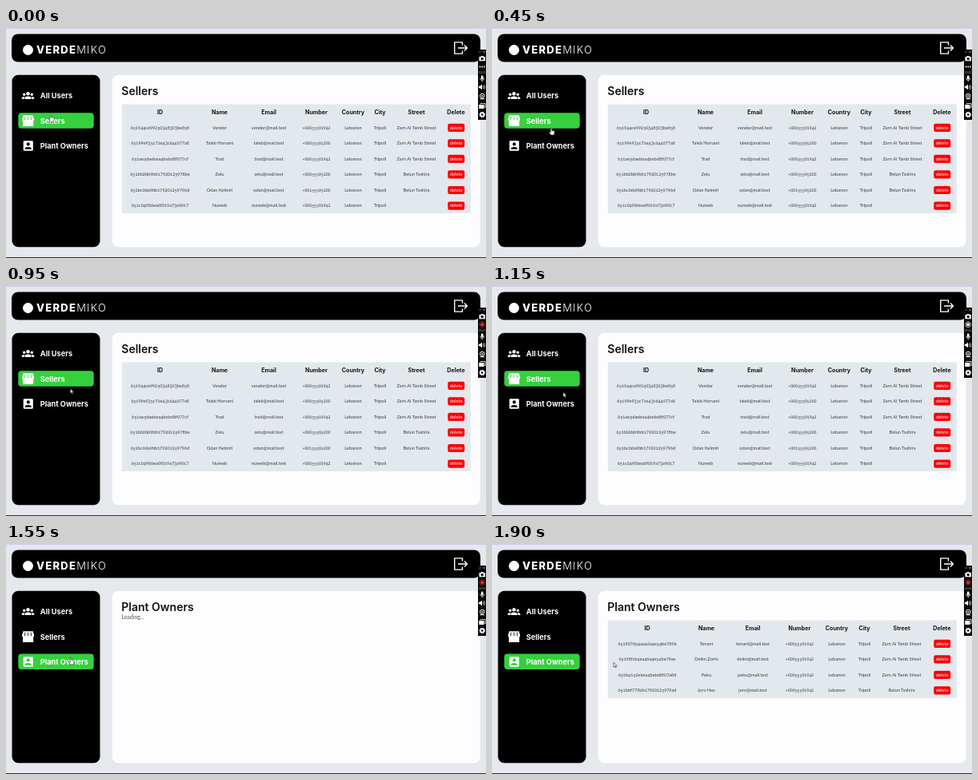
These frames come from a looping animation (600x288 px, 1.95 s). An HTML page:

```html
<!DOCTYPE html>
<html lang="en">
<head>
<meta charset="utf-8">
<title>Admin dashboard</title>
<style>
html, body { margin: 0; width: 100%; height: 100%; overflow: hidden; background: #e5e9ed; }
svg { display: block; width: 100vw; height: 100vh; }
text { font-family: Inter, sans-serif; }
.logo { font-size: 13px; font-weight: 800; letter-spacing: 1.25px; fill: #fff; }
.logo .thin { font-weight: 300; }
.menu { font-size: 9.2px; font-weight: 700; fill: #fff; }
.title { font-size: 14px; font-weight: 600; fill: #111; }
.head { font-size: 7.1px; font-weight: 700; fill: #151515; text-anchor: middle; }
.cell { font: 5.7px Lato, sans-serif; fill: #3c3e40; text-anchor: middle; font-variant-numeric: oldstyle-nums; }
.num { font-size: 5.4px; }
.del { font: 5.8px Lato, sans-serif; fill: #fff; text-anchor: middle; }
.load { font: 6.8px Lato, sans-serif; fill: #555; }

.sellers, .loading, .owners, .rows, .hover, .dots, .red, .white, .hand, .arrow {
  animation: 1950ms step-end infinite;
}
.sellers { animation-name: sellers; }
.loading { animation-name: loading; }
.owners { animation-name: owners; }
.rows { animation-name: rows; }
.hover { animation-name: hover; }
.dots { animation-name: dots; }
.red { animation-name: red; }
.white { animation-name: white; }
.hand { animation-name: hand; }
.arrow { animation-name: arrow; }
.cursor { animation: move 1950ms linear infinite; }

@keyframes sellers { 0% { opacity: 1 } 79.487%, 100% { opacity: 0 } }
@keyframes loading { 0% { opacity: 0 } 79.487% { opacity: 1 } 89.744%, 100% { opacity: 0 } }
@keyframes owners { 0% { opacity: 0 } 79.487%, 100% { opacity: 1 } }
@keyframes rows { 0% { opacity: 0 } 89.744%, 100% { opacity: 1 } }
@keyframes hover { 0% { opacity: 0 } 64.103%, 100% { opacity: 1 } }
@keyframes dots { 0% { opacity: 1 } 25.641%, 100% { opacity: 0 } }
@keyframes red { 0% { opacity: 0 } 25.641% { opacity: 1 } 51.282% { opacity: 0 } 79.487%, 100% { opacity: 1 } }
@keyframes white { 0% { opacity: 0 } 51.282% { opacity: 1 } 79.487%, 100% { opacity: 0 } }
@keyframes hand { 0% { opacity: 1 } 43.59% { opacity: 0 } 64.103% { opacity: 1 } 87.179%, 100% { opacity: 0 } }
@keyframes arrow { 0% { opacity: 0 } 43.59% { opacity: 1 } 64.103% { opacity: 0 } 87.179%, 100% { opacity: 1 } }
/* the pointer advances once every 50 ms */
@keyframes move {
  0% { transform: translate(56px, 108.5px); animation-timing-function: steps(3) }
  7.692%, 15.385% { transform: translate(70px, 120px); animation-timing-function: steps(2) }
  20.513% { transform: translate(74px, 125px) }
  41.026% { transform: translate(74px, 125px); animation-timing-function: steps(7) }
  58.974% { transform: translate(89px, 133px); animation-timing-function: steps(4) }
  69.231% { transform: translate(81px, 142px) }
  79.487% { transform: translate(81px, 142px); animation-timing-function: steps(6) }
  94.872%, 100% { transform: translate(152px, 148px) }
}
</style>
</head>
<body>
<svg viewBox="0 0 600 288" preserveAspectRatio="none">
  <rect width="600" height="288" fill="#e5e9ed"/>
  <rect width="600" height="1" fill="#cfcbee"/>
  <rect y="287" width="600" height="1" fill="#26282c"/>

  <rect x="7" y="7.500" width="586" height="35" rx="8"/>
  <circle cx="27.500" cy="27.500" r="6.500" fill="#fff"/>
  <text class="logo" x="38" y="31.700">VERDE<tspan class="thin">MIKO</tspan></text>
  <g fill="none" stroke="#fff" stroke-width="1.400" stroke-linejoin="round">
    <path d="M570.500 21.500V17.900H560.700V32.100H570.500V28.500M565 25H576.500M573 21.500L576.500 25L573 28.500"/>
  </g>

  <rect x="7.500" y="58.700" width="110" height="215.600" rx="8"/>
  <rect class="sellers" x="15.300" y="106.300" width="94.400" height="19.400" rx="4" fill="#34d13d"/>
  <rect class="hover" x="15.300" y="137.600" width="94.400" height="19.400" rx="4" fill="#34d13d"/>
  <g fill="#fff">
    <circle cx="27.500" cy="82.300" r="2.200"/>
    <circle cx="22.700" cy="83.200" r="1.700"/>
    <circle cx="32.300" cy="83.200" r="1.700"/>
    <path d="M23.500 89V87.600Q23.500 85.500 27.500 85.500T31.500 87.600V89ZM19.700 89V87.600Q19.800 85.800 23.200 85.900Q22.600 86.600 22.600 89ZM35.300 89V87.600Q35.200 85.800 31.800 85.900Q32.400 86.600 32.400 89Z"/>
    <path fill-rule="evenodd" d="M21.500 109.300H33.700L35.200 114.200Q35.200 116 34.200 116.500V123H21V116.500Q20 116 20 114.200ZM23.500 110.800L23 115H23.900L24.300 110.800ZM27.100 110.800V115H27.900V110.800ZM30.700 110.800L31.100 115H32L31.500 110.800Z"/>
    <path fill-rule="evenodd" d="M23 141.300H32.500Q33.800 141.300 33.800 142.600V152.400Q33.800 153.700 32.500 153.700H23Q21.700 153.700 21.700 152.400V142.600Q21.700 141.300 23 141.300ZM27.750 143.300A2.100 2.100 0 0 0 27.750 147.500A2.100 2.100 0 0 0 27.750 143.300ZM23.700 151.800H31.800V151Q31.500 148.900 27.750 148.900T23.700 151Z"/>
  </g>
  <text class="menu" x="42.800" y="88.300">All Users</text>
  <text class="menu" x="42.800" y="119.500">Sellers</text>
  <text class="menu" x="42.800" y="150.700">Plant Owners</text>

  <rect x="132.700" y="58.700" width="460" height="215.600" rx="8" fill="#fdfdff"/>
  <g class="sellers">
    <text class="title" x="144.300" y="84.200">Sellers</text>
    <g id="sellers"></g>
  </g>
  <g class="owners">
    <text class="title" x="144.300" y="84.200">Plant Owners</text>
    <text class="load loading" x="144.500" y="93.600">Loading...</text>
    <g id="owners" class="rows"></g>
  </g>

  <g fill="#fff">
    <rect x="590" y="27" width="10" height="88" fill="#0a0a0a"/>
    <path d="M591.500 31L593.500 29M596.500 29L598.500 31M598.500 29L596.500 31" stroke="#bbb" stroke-width=".6"/>
    <path fill-rule="evenodd" d="M591.500 36H593.300L594 35H596.500L597.200 36H599V41.300H591.500ZM595.200 36.800A1.700 1.700 0 0 0 595.200 40.200A1.700 1.700 0 0 0 595.200 36.800Z"/>
    <g class="dots">
      <circle cx="592.500" cy="48.500" r=".9"/><circle cx="595.200" cy="48.500" r=".9"/><circle cx="597.900" cy="48.500" r=".9"/>
    </g>
    <g class="red">
      <circle cx="595.200" cy="48.300" r="3.300" fill="none" stroke="#c8322c" stroke-width=".7"/>
      <circle cx="595.200" cy="48.300" r="2" fill="#e8362f"/>
    </g>
    <g class="white">
      <circle cx="595.200" cy="48.300" r="3.300" fill="none" stroke="#fff" stroke-width=".8"/>
      <circle cx="595.200" cy="48.300" r="2"/>
    </g>
    <text x="595.100" y="56.500" font-size="3" text-anchor="middle" fill="#aaa">00:00</text>
    <rect x="593.900" y="59.500" width="2.600" height="5" rx="1.300"/>
    <path d="M592.700 62.500Q592.700 65.600 595.200 65.600T597.700 62.500M595.200 65.600V67.300" fill="none" stroke="#fff" stroke-width=".7"/>
    <path d="M591 72.800H592.500L595 70.800V77.200L592.500 75.200H591Z"/>
    <path d="M596.200 72.300Q597.300 74 596.200 75.700M597.500 71Q599.700 74 597.500 77" fill="none" stroke="#fff" stroke-width=".7"/>
    <circle cx="595.200" cy="84.900" r="2.700" fill="none" stroke="#fff" stroke-width="1"/>
    <circle cx="595.200" cy="84.900" r="1"/>
    <path d="M592.500 88.700H598" stroke="#fff" stroke-width="1"/>
    <path d="M593 95.500V94.500H599V99.500H598" fill="none" stroke="#fff" stroke-width=".8"/>
    <rect x="591.300" y="96" width="6.200" height="5"/>
    <circle cx="595.200" cy="108.500" r="2.200" fill="none" stroke="#fff" stroke-width="1.700"/>
    <circle cx="595.200" cy="108.500" r="3.200" fill="none" stroke="#fff" stroke-width="1.100" stroke-dasharray="1.250 1.260"/>
  </g>

  <g class="cursor" fill="#fff" stroke="#222" stroke-width=".6" stroke-linejoin="round">
    <path class="hand" d="M-.8 .6Q0 -.5 .8 .6V3.400L3.600 4Q4.400 4.300 4.200 5.200L3.500 9H-.5L-2.600 5.800Q-2.500 4.800 -1.500 5.200L-.8 5.900Z"/>
    <path class="arrow" d="M0 0V6L1.300 4.800L2.300 7L3.300 6.500L2.300 4.400H4.100Z"/>
  </g>
</svg>
<script>
const heads = ['ID', 'Name', 'Email', 'Number', 'Country', 'City', 'Street', 'Delete'];
const streetA = 'Zarn Al Tamb Street', streetB = 'Belun Tashira';
const phoneA = '+00055501942', phoneB = '+00055505200';

const sellers = [
  ['651944ce99250348303be858', 'Vendor', 'vendor', phoneA, streetA],
  ['65199e935c71e43c644677a8', 'Taleb Horvani', 'taleb', phoneB, streetA],
  ['651ae5daebea4bebd8f077cf', 'Trad', 'trad', phoneA, streetA],
  ['651bb2bb9bb17920125978be', 'Zelu', 'zelu', phoneB, streetB],
  ['651bc0da9bb179201259796d', 'Odan Kelmiri', 'odan', '+00155505200', streetB],
  ['651c04986ea6f019a73a9017', 'Nureeb', 'nureeb', phoneA, '']
];
const owners = [
  ['651987d54aa46a4e54be789b', 'Tenant', 'tenant', phoneA, streetA],
  ['65198fcb4aa46a4e54be79ae', 'Delim Zorfa', 'delim', phoneA, streetA],
  ['651b4152ebea4bebd8f07a8d', 'Peku', 'peku', phoneA, streetA],
  ['651bbf779bb17920125979ad', 'Jorv Hex', 'jorv', phoneA, streetB]
];

const label = (cls, x, y, s) => `<text class="${cls}" x="${x}" y="${y}">${s}</text>`;

function drawTable(id, cols, list) {
  let out = `<rect x="144.800" y="95.500" width="436" height="${19.55 * list.length + 19.3}" fill="#e3e8ec"/>`;
  heads.forEach((h, i) => out += label('head', cols[i], 107.9, h));
  list.forEach(([key, name, user, phone, street], r) => {
    const y = 124.8 + 19.55 * r;
    const cells = [key, name, user + '@mail.test', phone, 'Lebanon', 'Tripoli', street];
    cells.forEach((s, i) => out += label(i === 3 ? 'cell num' : 'cell', cols[i], y + 1.9, s));
    out += `<rect x="552.300" y="${y - 5.1}" width="20.900" height="10.200" rx="2" fill="#fb0007"/>`;
    out += label('del', 562.7, y + 1.9, 'delete');
  });
  document.getElementById(id).innerHTML = out;
}

drawTable('sellers', [192.5, 267, 328.5, 388, 434, 467.5, 513, 562.5], sellers);
drawTable('owners', [194, 268, 326, 384.5, 431, 465.5, 512, 562.5], owners);
</script>
</body>
</html>
```
